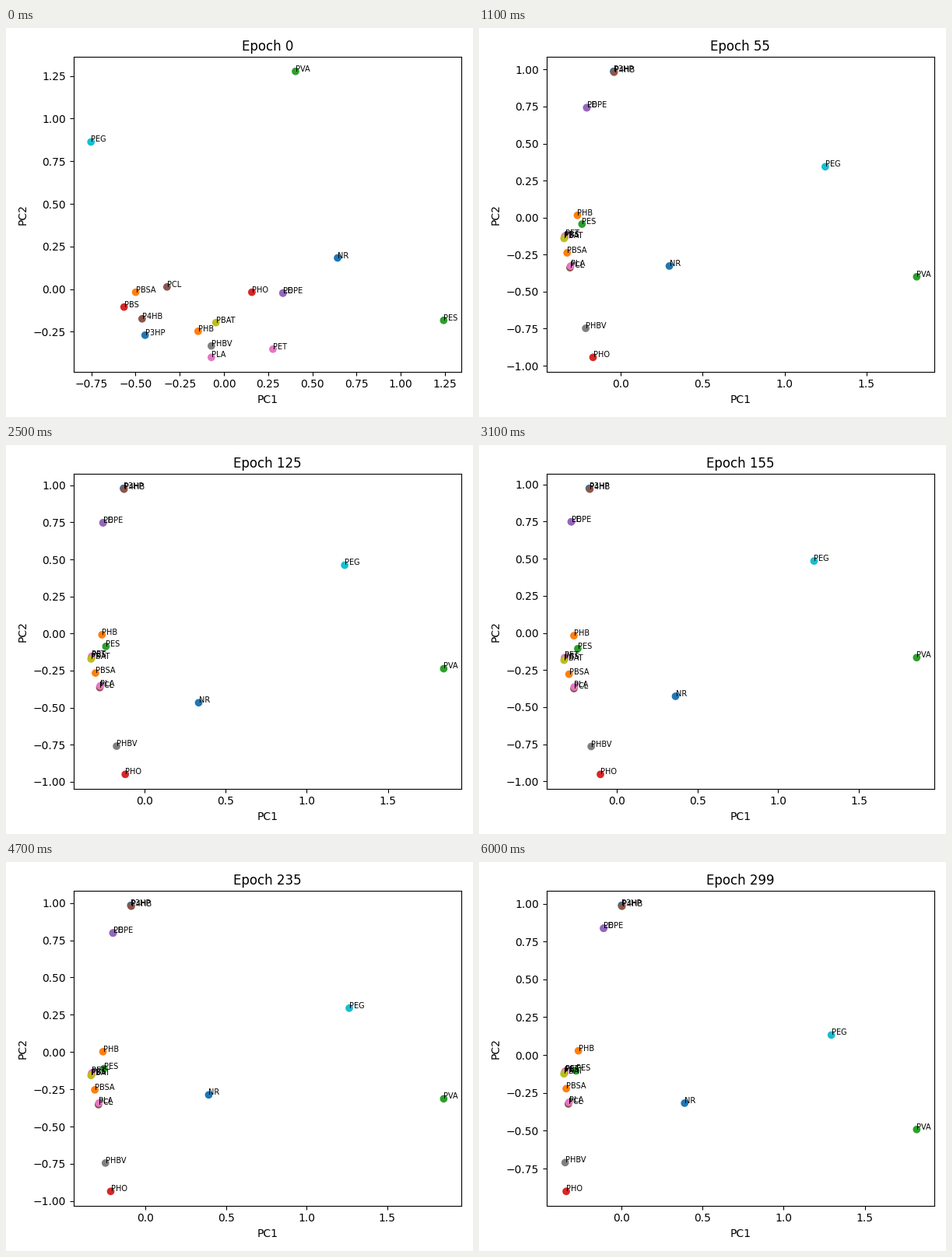
A matplotlib script that plays this animation: 600x500 px, repeating every 6100 ms.

```python
import numpy as np
import matplotlib.pyplot as plt
from matplotlib.animation import FuncAnimation

FRAMES, INTERVAL = 61, 100
STEP, SETTLED, LAST_EPOCH = 5, 55, 299

# Start point and settled point of each polymer, in drawing order.
POLYMERS = {
    "P3HP": ((-.446, -.270), (-.256, .955)),
    "PHB": ((-.146, -.247), (-.262, -.042)),
    "PVA": ((.405, 1.277), (1.868, 0)),
    "PBS": ((-.565, -.105), (-.306, -.202)),
    "PE": ((.334, -.023), (-.343, .730)),
    "P4HB": ((-.463, -.174), (-.252, .950)),
    "PET": ((.277, -.352), (-.306, -.194)),
    "PHBV": ((-.071, -.333), (-.098, -.776)),
    "PBAT": ((-.045, -.196), (-.308, -.212)),
    "PEG": ((-.752, .863), (1.180, .535)),
    "NR": ((.643, .183), (.410, -.230)),
    "PBSA": ((-.499, -.018), (-.269, -.303)),
    "PES": ((1.243, -.183), (-.232, -.134)),
    "PHO": ((.158, -.018), (-.027, -.958)),
    "LDPE": ((.334, -.023), (-.343, .730)),
    "PCL": ((-.322, .013), (-.230, -.397)),
    "PLA": ((-.071, -.400), (-.229, -.386)),
}
NAMES = list(POLYMERS)

# Total slow drift after settling, for the polymers that keep moving.
DRIFT = {"PVA": (.035, 0), "PEG": (.07, -.14), "NR": (.10, .05),
         "PHO": (-.13, 0), "PHBV": (-.10, 0), "PES": (-.02, -.08),
         "PE": (.04, .10), "LDPE": (.04, .10)}

# Vertical sway around the middle of the run.
SWAY = {"NR": -.18, "PEG": .05}

# The whole map turns about its centre: epoch and angle in radians.
TILT_EPOCHS = [55, 155, 205, 265, 299]
TILT_ANGLES = [-.2175, -.0893, -.1347, -.2013, -.2640]

start = np.array([POLYMERS[n][0] for n in NAMES])
settled = np.array([POLYMERS[n][1] for n in NAMES])
drift = np.array([DRIFT.get(n, (0, 0)) for n in NAMES])
sway = np.array([(0, SWAY.get(n, 0)) for n in NAMES])


def turned(points, angle):
    c, s = np.cos(angle), np.sin(angle)
    return points @ np.array([[c, s], [-s, c]])


def settled_map(epoch):
    progress = (epoch - SETTLED) / (LAST_EPOCH - SETTLED) - 0.5
    bump = np.exp(-((epoch - 128) / 45) ** 4)
    points = settled + drift * progress + sway * bump
    return turned(points, np.interp(epoch, TILT_EPOCHS, TILT_ANGLES))


def positions(epoch):
    """Fast ease-out from the start map, then slow motion of the settled one."""
    mix = (1 - min(epoch / SETTLED, 1)) ** 2.5
    return mix * start + (1 - mix) * settled_map(max(epoch, SETTLED))


def padded(values, margin=0.05):
    low, high = values.min(), values.max()
    pad = margin * (high - low)
    return low - pad, high + pad


fig, ax = plt.subplots(figsize=(6, 5), dpi=100)
ax.set_xlabel("PC1")
ax.set_ylabel("PC2")
title = ax.set_title("Epoch 0")
dots = ax.scatter(*start.T, c=[f"C{i % 10}" for i in range(len(NAMES))])
labels = [ax.text(x, y, name, fontsize=7)
          for name, (x, y) in zip(NAMES, start)]


def update(frame):
    epoch = min(frame * STEP, LAST_EPOCH)
    points = positions(epoch)
    title.set_text(f"Epoch {epoch}")
    dots.set_offsets(points)
    for label, point in zip(labels, points):
        label.set_position(point)
    ax.set_xlim(*padded(points[:, 0]))
    ax.set_ylim(*padded(points[:, 1]))
    fig.tight_layout()
    return [title, dots, *labels]


anim = FuncAnimation(fig, update, frames=FRAMES, interval=INTERVAL,
                     repeat=True, repeat_delay=0, blit=False)
plt.show()
```
